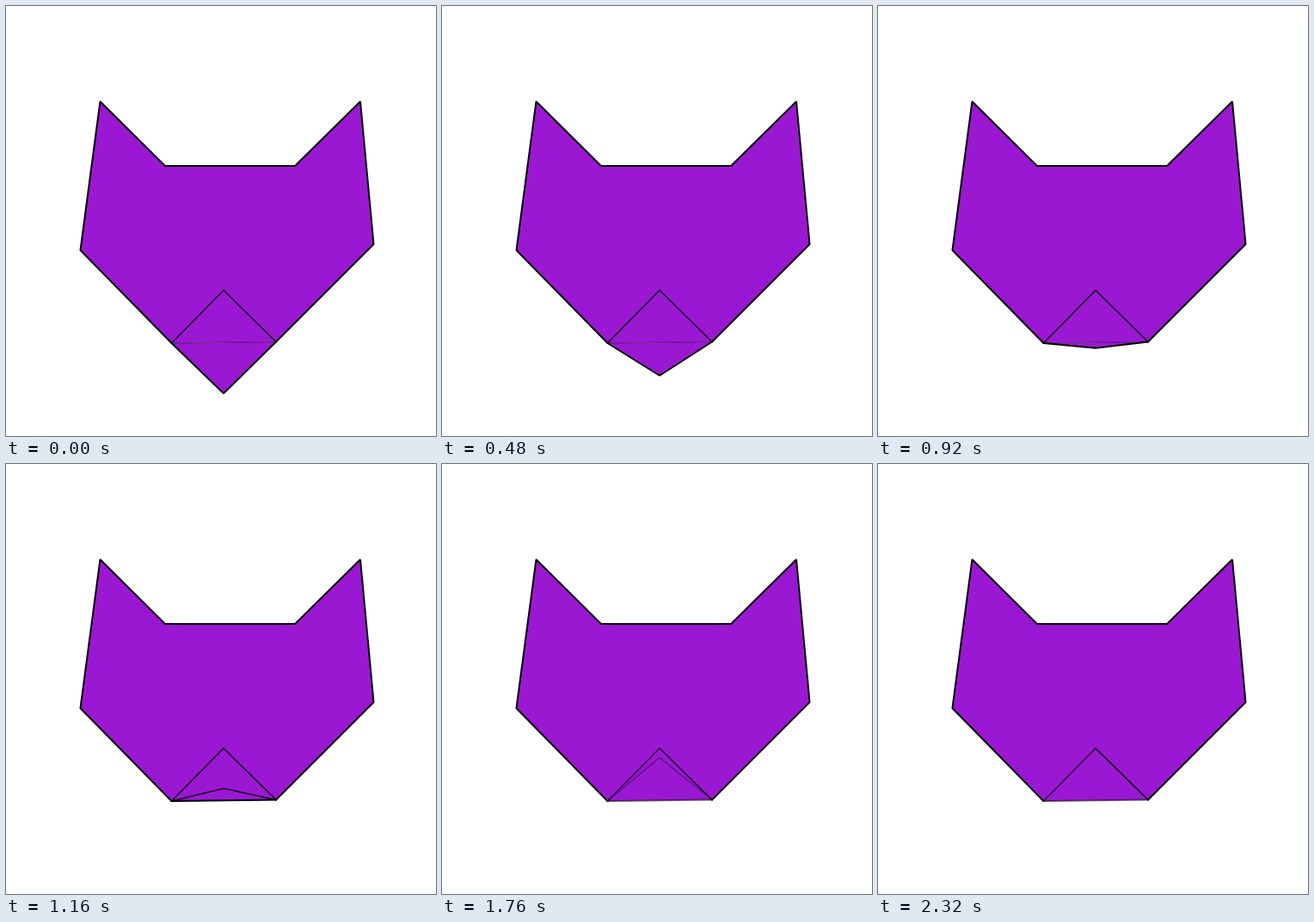
Write an HTML page with a canvas that moves like this. It is 500 px wide and 500 px high and loops after 2.72 s.

```html
<!DOCTYPE html>
<html lang="en">
<head>
<meta charset="utf-8">
<title>Paper fold</title>
<style>
  html, body { margin: 0; width: 100%; height: 100%; overflow: hidden; background: #fff; }
  canvas { display: block; }
</style>
</head>
<body>
<canvas id="stage" width="500" height="500"></canvas>
<script>
const ctx = document.getElementById('stage').getContext('2d');
const LOOP = 2720, HOLD = 160, STEP = 40, STEPS = 55, FLAT = 22;
const PURPLE = '#9b18d3';
const left = [192.5, 392], right = [314, 390.5], apex = [253, 330.5];
const head = [[86.5, 284], [109.5, 111], [185, 186], [336, 186], [412, 111], [427.5, 277]];

const clamp = v => Math.max(0, Math.min(1, v));
const ramp = (v, from, to) => clamp((v - from) / (to - from));

function trace(points, closed) {
  ctx.beginPath();
  points.forEach(p => ctx.lineTo(...p));
  if (closed) ctx.closePath();
}

function line(points, width, alpha) {
  trace(points);
  ctx.globalAlpha = alpha;
  ctx.lineWidth = width;
  ctx.stroke();
  ctx.globalAlpha = 1;
}

function fill(points) {
  trace(points, true);
  ctx.fillStyle = PURPLE;
  ctx.fill();
}

// The tip speeds up gently to the crease, then slows down towards the apex.
function tipHeight(step) {
  if (step < FLAT) {
    const p = step / FLAT;
    return 450.5 - 59.5 * (0.75 * p + 0.25 * p * p);
  }
  const rest = 1 - ramp(step, FLAT, STEPS);
  return apex[1] + 60.5 * rest * rest;
}

function draw(time) {
  const t = time % LOOP;
  const step = t < HOLD ? 0 : Math.min(STEPS, Math.floor((t - HOLD) / STEP) + 1);
  const tip = [253, tipHeight(step)];
  const folded = step >= FLAT;
  const fade = ramp(step, 26, 34);

  ctx.clearRect(0, 0, 500, 500);
  ctx.lineJoin = 'bevel';
  ctx.lineCap = 'round';
  ctx.strokeStyle = '#000';

  fill([...head, right, left]);
  if (!folded) fill([left, tip, right]);
  line([left, ...head, right], 2, 1);

  line([left, apex], 1.6, 0.85 - 0.4 * ramp(step, 35, 48));
  line([apex, right], 1.6, 0.85);

  if (folded) {
    line([left, right], 2, 1 - 0.45 * fade);
    line([left, tip, right], 1.6, 0.85 - 0.5 * fade);
  } else {
    line([left, right], 1.5, 0.35);
    line([left, tip, right], 2, 1);
  }
}

const start = performance.now();
function tick() {
  draw(performance.now() - start);
  requestAnimationFrame(tick);
}
tick();
</script>
</body>
</html>
```
